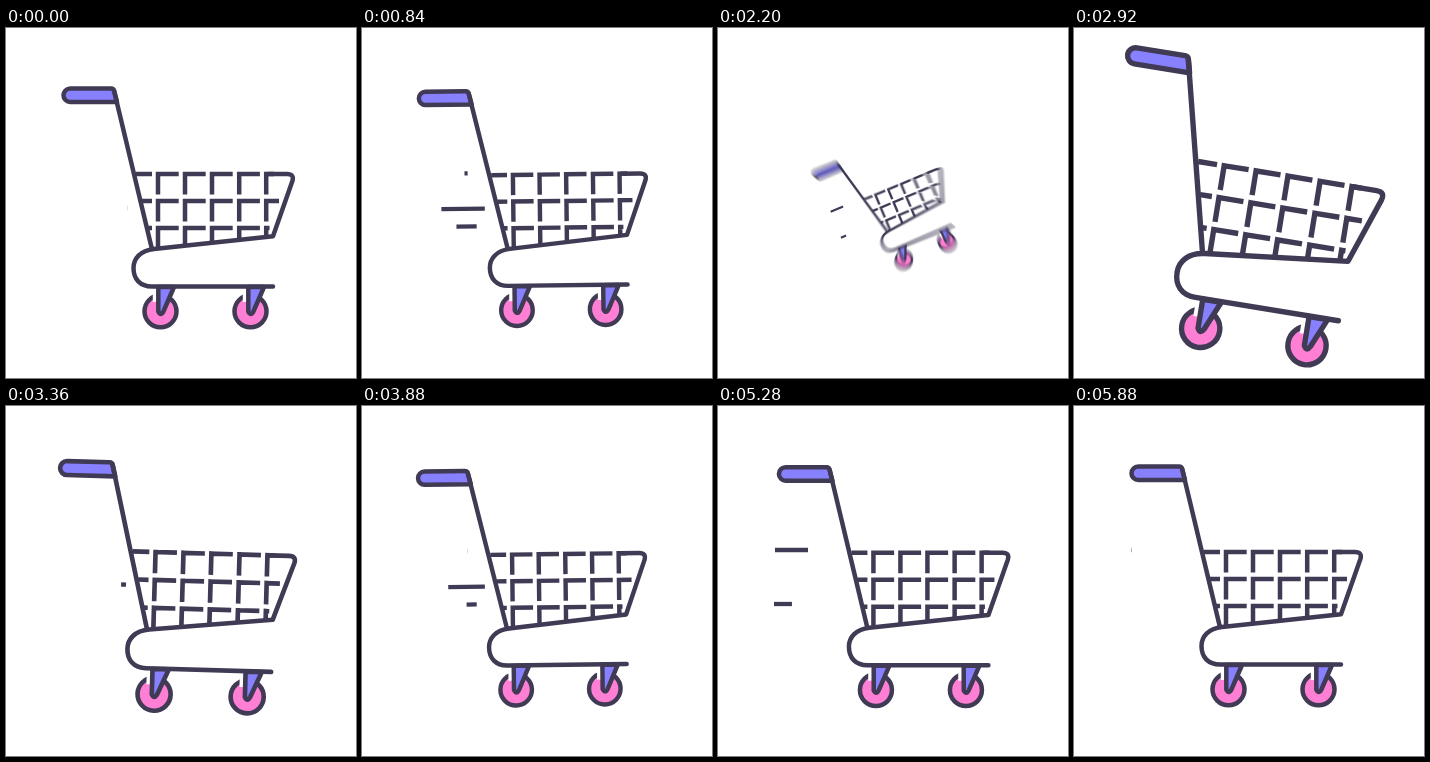
These frames come from a looping animation (350 by 350 pixels, 5920 ms). An HTML page with a canvas:

```html
<!DOCTYPE html>
<html lang="en">
<head>
<meta charset="utf-8">
<title>Shopping cart</title>
<style>
  html, body { margin: 0; width: 100%; height: 100%; overflow: hidden; background: #fff; }
  canvas { display: block; width: 100vw; height: 100vh; }
</style>
</head>
<body>
<canvas id="stage"></canvas>
<script>
const SIZE = 350, LOOP = 5920, STEP = 40, MID = 2380;
const INK = '#403a55', PURPLE = '#8780ff', PINK = '#ff7fd4';
const canvas = document.getElementById('stage');
const ctx = canvas.getContext('2d');
const layer = document.createElement('canvas');
const pen = layer.getContext('2d');

// How far the cart has shrunk, by distance in time from the vanishing point.
const SHRINK = [[0, 1], [20, 1], [180, .484], [560, -.2], [860, -.062],
                [1220, 0], [1500, .015], [1820, 0], [4000, 0]];
// Slow drift of the cart inside its frame.
const DRIFT_X = [[0, 0], [1520, -2.1], [2920, -2.5], [3880, -2], [4200, 1.6],
                 [4600, 3.7], [5000, 4], [5400, 3], [5880, 0], [5920, 0]];
const DRIFT_Y = [[0, 0], [1520, .6], [2920, 1.6], [3880, 1.9], [4200, 2],
                 [4600, 1.3], [5400, .6], [5880, 0], [5920, 0]];
// Speed lines: left end, right end, height, delay.
const LINES = [[74, 122, 180, 0], [56, 113.5, 198, 440], [57, 105, 144, 700]];
const BURSTS = [-40, 3140];

// Smooth curve through the keys that never overshoots them.
function curve(keys, t) {
  const last = keys.length - 1;
  if (t <= keys[0][0]) return keys[0][1];
  if (t >= keys[last][0]) return keys[last][1];
  const rise = i => (keys[i + 1][1] - keys[i][1]) / (keys[i + 1][0] - keys[i][0]);
  const slope = i => {
    if (i === 0 || i === last) return 0;
    const a = rise(i - 1), b = rise(i);
    return a * b > 0 ? 2 * a * b / (a + b) : 0;
  };
  let i = 0;
  while (t > keys[i + 1][0]) i++;
  // The first visible moment starts at full speed.
  const hard = keys === SHRINK && i === 1;
  const h = keys[i + 1][0] - keys[i][0], u = (t - keys[i][0]) / h;
  const m0 = (hard ? rise(i) : slope(i)) * h, m1 = slope(i + 1) * h;
  const u2 = u * u, u3 = u2 * u;
  return (2 * u3 - 3 * u2 + 1) * keys[i][1] + (u3 - 2 * u2 + u) * m0 +
         (3 * u2 - 2 * u3) * keys[i + 1][1] + (u3 - u2) * m1;
}

const ease = u => (1 - Math.cos(Math.PI * Math.min(1, Math.max(0, u)))) / 2;

const HANDLE = new Path2D('M111 74H64.25a6.75 6.75 0 0 1 0-13.5H105Q107.6 60.5 108.2 63Z');
const FRAME = new Path2D('M108 62.5L145.8 220.5M262 146H281Q288.5 146 286.4 153L267 208.2' +
  'L148 221C134 222.5 127.5 231 127.5 240C127.5 251 134 258.5 146 258.5H267');
const FORK = new Path2D('M152.3 259V283.5Q154.8 288.5 157.4 283.5L168 259Z');
const GRID = makeGrid();

function makeGrid() {
  const grid = new Path2D();
  const seg = (x1, y1, x2, y2) => { grid.moveTo(x1, y1); grid.lineTo(x2, y2); };
  const cols = [152, 179, 206, 233.2, 260.2];
  const starts = [130, 136, 142], ends = [268, 273, 263.5];
  [146, 173, 200].forEach((y, row) => {
    seg(starts[row], y, 146, y);
    cols.forEach((x, i) => {
      seg(x - 2.2, y, i < 4 ? x + 20.7 : ends[row], y);
      seg(x, y - 2.2, x, row < 2 ? y + 20.5 : 220.5 - (x - 152) * .108);
    });
  });
  return grid;
}

function drawWheel(g, shift) {
  g.save();
  g.translate(shift, 0);
  g.beginPath();
  g.arc(154.5, 283.3, 16, 0, 7);
  g.fillStyle = PINK;
  g.fill();
  g.stroke();
  g.fillStyle = '#fff';
  g.fillRect(146.8, 263, 4.5, 11);
  g.fillStyle = PURPLE;
  g.fill(FORK);
  g.stroke(FORK);
  g.restore();
}

function drawCart(g) {
  g.strokeStyle = INK;
  g.lineWidth = 4.5;
  g.lineJoin = 'round';
  g.lineCap = 'butt';
  g.stroke(GRID);
  drawWheel(g, 0);
  drawWheel(g, 90);
  g.lineCap = 'round';
  g.fillStyle = PURPLE;
  g.fill(HANDLE);
  g.stroke(HANDLE);
  g.stroke(FRAME);
}

function setPose(g, t) {
  const shrink = curve(SHRINK, Math.abs(t - MID));
  const scale = Math.max(0, 1 - shrink);
  g.setTransform(canvas.width / SIZE, 0, 0, canvas.height / SIZE, 0, 0);
  g.translate(175, 175);
  g.rotate(-47 * shrink * Math.PI / 180);
  g.scale(scale, scale);
  g.translate(-175, -175);
  return scale > .005;
}

function drawLines(t) {
  if (!setPose(ctx, t)) return;
  ctx.strokeStyle = INK;
  ctx.lineWidth = 4.3;
  for (const start of BURSTS) {
    for (const [left, right, y, delay] of LINES) {
      const age = t - start - delay;
      const head = right - (right - left) * ease(age / 1080);
      const tail = right - (right - left) * ease((age - 1040) / 1060);
      if (tail - head < .1) continue;
      ctx.beginPath();
      ctx.moveTo(head, y);
      ctx.lineTo(tail, y);
      ctx.stroke();
    }
  }
}

function drawSample(t) {
  pen.setTransform(1, 0, 0, 1, 0, 0);
  pen.fillStyle = '#fff';
  pen.fillRect(0, 0, layer.width, layer.height);
  if (!setPose(pen, t)) return;
  pen.translate(curve(DRIFT_X, t), curve(DRIFT_Y, t));
  drawCart(pen);
}

function render(t) {
  // Fast moves are averaged over a short shutter.
  const gap = Math.abs(t - MID);
  const count = gap > 30 && gap < 500 ? 10 : 1;
  for (let i = 0; i < count; i++) {
    drawSample(t + ((i + .5) / count - .5) * 22);
    ctx.setTransform(1, 0, 0, 1, 0, 0);
    ctx.globalAlpha = 1 / (i + 1);
    ctx.drawImage(layer, 0, 0);
  }
  ctx.globalAlpha = 1;
  drawLines(t);
}

function resize() {
  const ratio = window.devicePixelRatio || 1;
  canvas.width = layer.width = Math.round(innerWidth * ratio);
  canvas.height = layer.height = Math.round(innerHeight * ratio);
}

const begin = performance.now();
function tick() {
  const t = (performance.now() - begin) % LOOP;
  render(Math.floor(t / STEP) * STEP);
  requestAnimationFrame(tick);
}
addEventListener('resize', resize);
resize();
tick();
</script>
</body>
</html>
```
